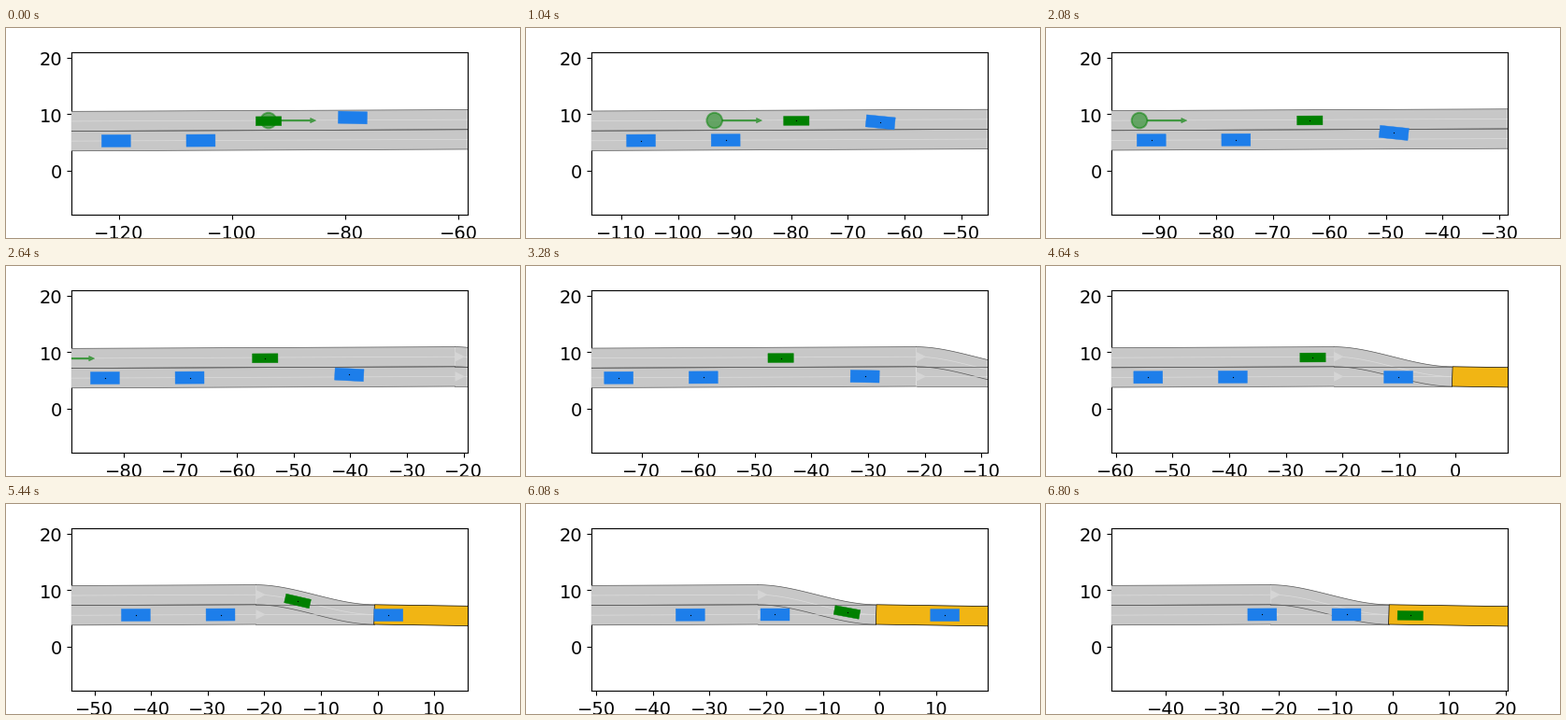
Write a matplotlib script that moves like this. It is 550 by 225 pixels and loops after 6880 ms.

```python
import numpy as np
import matplotlib.pyplot as plt
from matplotlib.animation import FuncAnimation
from matplotlib.patches import Circle, FancyArrow, Polygon
from matplotlib.ticker import MultipleLocator
from matplotlib.transforms import ScaledTranslation

FRAMES, INTERVAL = 86, 80
VIEW_W, LANE_W = 70, 3.5
MERGE_X, GOAL_X, EXIT_X = -21.5, -0.65, 21
ROAD, BOUND, CENTER, ARROW = "#c7c7c7", "#555555", "#dddddd", "#d5d5d5"
BLUE, GREEN, GOAL = "#1d7eea", "g", "#f1b514"


def base(x):
    """Right-hand edge of the lower lane."""
    return 3.96 + 0.0042 * np.minimum(x - MERGE_X, 0) - 0.015 * np.maximum(x - GOAL_X, 0)


def straight(x):
    return 0 * x


def merging(x):
    """Offset of the upper lane, which eases into the lower one."""
    u = np.clip((x - MERGE_X) / (GOAL_X - MERGE_X), 0, 1)
    return LANE_W * (1 - u * u * (3 - 2 * u))


def lane_mid(x, shift):
    return base(x) + shift(x) + LANE_W / 2


# Left view edge at evenly spaced key steps, joined by cubic Hermite pieces.
KEY_STEP = 14
KEYS = np.array([-128.38, -112.93, -94.56, -76.48, -61.66, -52.68, -49.63])
SLOPES = np.gradient(KEYS, edge_order=2)


def camera(s):
    i = min(s // KEY_STEP, len(KEYS) - 2)
    u = s / KEY_STEP - i
    ease = u * u * (3 - 2 * u)
    return (KEYS[i] + ease * (KEYS[i + 1] - KEYS[i])
            + u * (1 - u) ** 2 * SLOPES[i] - u * u * (1 - u) * SLOPES[i + 1])


def follower(start):
    def path(s):
        x = start + 1.1605 * s
        return x, lane_mid(x, straight)
    return path


def lead(s):
    """Constant speed with a logistic change into the lower lane."""
    return -78.68 + 1.203 * s, 5.6 + 4 / (1 + np.exp((s - 18.9) / 6.3))


def ego(s):
    """Keeps its lane and brakes gently before the merge."""
    x = -93.52 + 1.2025 * s - 0.0034 * max(s - 48.4, 0) ** 2
    return x, lane_mid(x, merging) - 0.12


fig = plt.figure(figsize=(5.5, 2.25), dpi=100, facecolor="white")
ax = fig.add_axes([0.125, 0.1104, 0.775, 0.7732])
ax.set_aspect("equal")
ax.set_ylim(-7.78, 20.93)
ax.set_yticks([0, 10, 20])
ax.tick_params(labelsize=14)
ax.tick_params(axis="x", pad=4.2)
drop = ScaledTranslation(0, -0.009, fig.dpi_scale_trans)
for label in ax.get_yticklabels():
    label.set_transform(label.get_transform() + drop)


def lanelet(x0, x1, shift):
    x = np.linspace(x0, x1, 50)
    mid = lane_mid(x, shift)
    right, left = mid - LANE_W / 2, mid + LANE_W / 2
    ax.fill_between(x, right, left, facecolor=ROAD, edgecolor="none", lw=0, zorder=9)
    for y, color in ((left, BOUND), (right, BOUND), (mid, CENTER)):
        ax.plot(x, y, color=color, lw=0.5, zorder=10)
    r = LANE_W / 4
    ax.add_patch(Polygon([(x0, mid[0] - r), (x0, mid[0] + r), (x0 + 2 * r, mid[0])],
                         facecolor=ARROW, edgecolor="none", zorder=10))


for span in ((-200, MERGE_X), (MERGE_X, GOAL_X)):
    for shift in (merging, straight):
        lanelet(*span, shift)

gx = np.array([GOAL_X, 60])
ax.add_patch(Polygon([*zip(gx, base(gx)), *zip(gx[::-1] + [0, 0.1], base(gx[::-1]) + LANE_W)],
                     facecolor=GOAL, edgecolor="black", lw=0.5, zorder=15))

START = (-93.55, 8.9)
ax.add_patch(Circle(START, 1.37, color=GREEN, alpha=0.5, lw=1.4, zorder=19))
ax.add_patch(FancyArrow(START[0] + 1.4, START[1], 7, 0, width=0.3, head_width=0.9,
                        head_length=1, length_includes_head=True, color=GREEN,
                        alpha=0.65, lw=0.3, zorder=19))


class Car:
    def __init__(self, path, length, width, color):
        self.path = path
        self.corners = np.array([(-1, -1), (1, -1), (1, 1), (-1, 1)]) * (length / 2, width / 2)
        self.body = ax.add_patch(Polygon(self.corners, facecolor=color,
                                         edgecolor=color, lw=0.3, zorder=20))
        self.dot, = ax.plot([], [], "o", color="black", ms=0.9, mew=0, zorder=21)

    def place(self, s):
        pos = np.array(self.path(s))
        step = np.subtract(self.path(s + 0.5), self.path(s - 0.5))
        c, n = step / np.hypot(*step)
        self.body.set_xy(self.corners @ np.array([[c, n], [-n, c]]) + pos)
        self.dot.set_data([pos[0]], [pos[1]])
        self.body.set_visible(pos[0] < EXIT_X)
        self.dot.set_visible(s > 0 and pos[0] < EXIT_X)


cars = [Car(path, 5.1, 2.15, BLUE) for path in (follower(-120.45), follower(-105.5), lead)]
cars.append(Car(ego, 4.51, 1.61, GREEN))


def update(frame):
    s = max(frame - 1, 0)  # the first pose is held for two frames
    left = camera(s)
    ax.set_xlim(left, left + VIEW_W)
    ax.xaxis.set_major_locator(MultipleLocator(10 if s else 20))
    for car in cars:
        car.place(s)
    return []


anim = FuncAnimation(fig, update, frames=FRAMES, interval=INTERVAL,
                     repeat=True, repeat_delay=0, blit=False)
plt.show()
```
